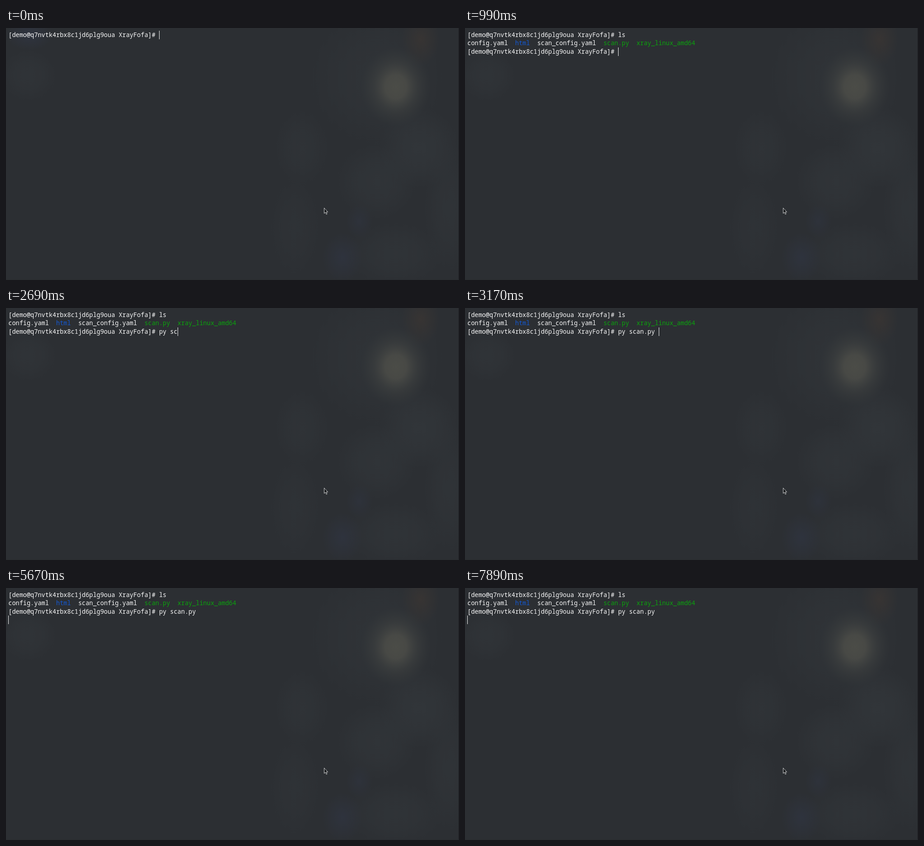
An HTML page that plays this animation: 1003 px wide and 558 px high, repeating every 8 s.

```html
<!DOCTYPE html>
<html lang="en">
<head>
<meta charset="utf-8">
<title>Terminal session</title>
<style>
  html, body { margin: 0; width: 100%; height: 100%; overflow: hidden; background: #2c2f33; }
  svg { display: block; width: 1003px; height: 558px; }
  text { font: 500 13.57px "Noto Sans Mono", "DejaVu Sans Mono", monospace; fill: #fafafa; white-space: pre; }
  .dir { fill: #1259d6; }
  .exe { fill: #0ba30d; }
</style>
</head>
<body>
<svg viewBox="0 0 1003 558">
  <defs>
    <radialGradient id="lamp">
      <stop offset="0" stop-color="#4b4c47"/>
      <stop offset=".3" stop-color="#494a46" stop-opacity=".95"/>
      <stop offset=".6" stop-color="#434543" stop-opacity=".45"/>
      <stop offset="1" stop-color="#3a3d3d" stop-opacity="0"/>
    </radialGradient>
    <radialGradient id="haze">
      <stop offset="0" stop-color="#2f3440"/>
      <stop offset="1" stop-color="#2f3440" stop-opacity="0"/>
    </radialGradient>
    <radialGradient id="mist">
      <stop offset="0" stop-color="#313539"/>
      <stop offset=".5" stop-color="#313539" stop-opacity=".7"/>
      <stop offset="1" stop-color="#313539" stop-opacity="0"/>
    </radialGradient>
    <radialGradient id="rust">
      <stop offset="0" stop-color="#373433"/>
      <stop offset="1" stop-color="#373433" stop-opacity="0"/>
    </radialGradient>
  </defs>

  <rect width="1003" height="558" fill="#2c2f33"/>
  <g fill="url(#mist)">
    <ellipse cx="820" cy="110" rx="150" ry="150" opacity=".7"/>
    <ellipse cx="915" cy="265" rx="90" ry="90"/>
    <ellipse cx="820" cy="340" rx="90" ry="85" opacity=".8"/>
    <ellipse cx="655" cy="265" rx="60" ry="85" opacity=".6"/>
    <ellipse cx="640" cy="440" rx="55" ry="110" opacity=".5"/>
    <ellipse cx="860" cy="500" rx="110" ry="70" opacity=".7"/>
    <ellipse cx="985" cy="400" rx="60" ry="140" opacity=".7"/>
  </g>
  <g fill="url(#haze)">
    <ellipse cx="782" cy="428" rx="30" ry="38" opacity=".6"/>
    <ellipse cx="745" cy="508" rx="45" ry="55" opacity=".8"/>
    <ellipse id="glow" cx="52" cy="14" rx="52" ry="36"/>
  </g>
  <ellipse cx="918" cy="25" rx="42" ry="60" fill="url(#rust)"/>
  <ellipse cx="863" cy="130" rx="78" ry="88" fill="url(#lamp)"/>
  <ellipse cx="50" cy="105" rx="62" ry="58" fill="url(#mist)" opacity=".7"/>
  <path d="M1002.5 0V558" stroke="#1d1f22"/>
  <path d="M0 557.5H1003" stroke="#292c2f"/>

  <text x="5.3" y="20" id="first"></text>
  <g id="output">
    <text x="5.3" y="38">config.yaml  <tspan class="dir">html</tspan>  scan_config.yaml  <tspan class="exe">scan.py</tspan>  <tspan class="exe">xray_linux_amd64</tspan></text>
    <text x="5.3" y="57" id="second"></text>
  </g>
  <rect id="caret" width="1" height="19" fill="#f6f6f6"/>
  <path d="M704.5 398.5V410.5L707.3 408L709.2 412.6L711 411.8L709.1 407.4H712.6Z" fill="#17191b" stroke="#e4e5e5" stroke-width=".9"/>
</svg>
<script>
  const LOOP = 8000;
  const PROMPT = "[demo@q7nvtk4rbx8c1jd6plg9oua XrayFofa]# ";
  const ROW_TOP = [6, 24, 43, 61];

  // [time in ms, caret row, text typed on that row, caret shown]
  const steps = [
    [0, 0, "", true],
    [240, 0, "", false],
    [520, 0, "l", false],
    [570, 0, "l", true],
    [710, 0, "ls", true],
    [990, 2, "", true],
    [1510, 2, "", false],
    [1980, 2, "p", false],
    [2030, 2, "p", true],
    [2270, 2, "py", true],
    [2460, 2, "py ", true],
    [2600, 2, "py s", true],
    [2690, 2, "py sc", true],
    [2830, 2, "py scan", true],
    [3020, 2, "py scan.py ", true],
    [3830, 2, "py scan.py ", false],
    [4390, 2, "py scan.py ", true],
    [4490, 3, "", true],
    [5100, 3, "", false],
    [5670, 3, "", true],
    [6240, 3, "", false],
    [6760, 3, "", true],
    [7320, 3, "", false],
    [7890, 3, "", true]
  ];

  const el = id => document.getElementById(id);
  const first = el("first"), second = el("second"), output = el("output");
  const caret = el("caret"), glow = el("glow");
  let shown = null;

  function draw(step) {
    const [, row, typed, lit] = step;
    const listed = row > 0;
    first.textContent = PROMPT + (listed ? "ls" : typed);
    second.textContent = PROMPT + (row === 3 ? "py scan.py" : typed);
    output.setAttribute("visibility", listed ? "visible" : "hidden");
    glow.setAttribute("opacity", listed ? 0.15 : 1);

    const col = row === 3 ? 0 : PROMPT.length + typed.length;
    caret.setAttribute("x", Math.floor(5.4 + 8.147 * col));
    caret.setAttribute("y", ROW_TOP[row]);
    caret.setAttribute("visibility", lit ? "visible" : "hidden");
  }

  const start = performance.now();
  function tick() {
    const t = (performance.now() - start) % LOOP;
    const step = steps.findLast(s => s[0] <= t) || steps[0];
    if (step !== shown) draw(shown = step);
    requestAnimationFrame(tick);
  }
  tick();
</script>
</body>
</html>
```
